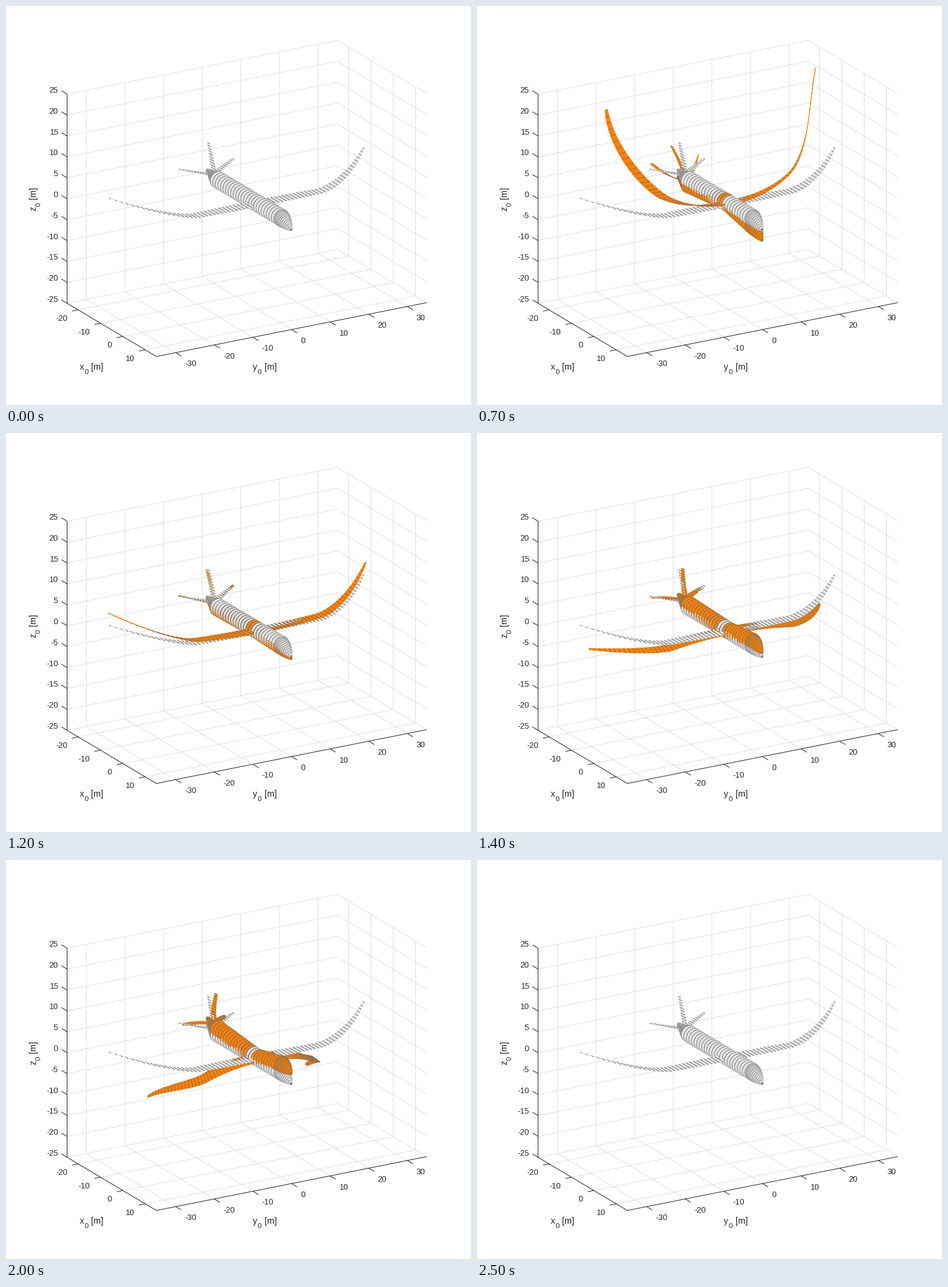
A matplotlib script that plays this animation: 750 px wide and 645 px high, repeating every 2600 ms.

```python
import numpy as np
import matplotlib.pyplot as plt
from matplotlib.animation import FuncAnimation
from matplotlib.collections import LineCollection, PolyCollection

W, H, DPI = 750, 645, 100
PX = 72 / DPI
FRAMES, INTERVAL = 26, 100
INK, GRID, EDGE = "#262626", "#dfdfdf", (0.42, 0.42, 0.42, 1)
LIGHT, ORANGE = (0.91, 0.91, 0.91, 1), (1, 0.5, 0, 1)
CLEAR = (0, 0, 0, 0)

# Orthographic view: metres to pixels, and depth towards the viewer
ORIGIN = np.array([406.0, 321.3])
VIEW = np.array([[3.6, 2.15], [6.229, -1.243], [0, -6.76]])
DEPTH = np.array([0.814, -0.47, 0.342])
X0, X1, Y0, Y1, Z0, Z1 = -25, 15, -35, 35, -25, 25


def project(points):
    return ORIGIN + np.asarray(points, float) @ VIEW


plt.rcParams["font.family"] = "Liberation Sans"
fig = plt.figure(figsize=(W / DPI, H / DPI), dpi=DPI, facecolor="white")
ax = fig.add_axes([0, 0, 1, 1])
ax.set_xlim(0, W)
ax.set_ylim(H, 0)
ax.axis("off")


def label(x, y, text, size=13, **kw):
    ax.text(x, y, text, fontsize=size * PX, color=INK, va="baseline", **kw)


def draw_axes():
    grid, ticks = [], []

    def tick(value, path, outward, dx, dy, ha):
        base = np.array(path[0], float)
        grid.append(path)
        ticks.append([base, base + outward])
        px, py = project(base)
        label(px + dx, py + dy, str(value), ha=ha)

    for x in range(-20, 11, 10):
        tick(x, [(x, Y0, Z0), (x, Y1, Z0), (x, Y1, Z1)],
             (0, -1.6, 0), -17, 18.5, "right")
    for y in range(-30, 31, 10):
        tick(y, [(X1, y, Z0), (X0, y, Z0), (X0, y, Z1)],
             (2.5, 0, 0), 15, 22.5, "left")
    for z in range(-25, 26, 5):
        tick(z, [(X0, Y0, z), (X0, Y1, z), (X1, Y1, z)],
             (-2.5, 0, 0), -14, -2, "right")
    spine = [(X0, Y0, Z1), (X0, Y0, Z0), (X1, Y0, Z0), (X1, Y1, Z0)]
    for lines, color in ((grid, GRID), (ticks + [spine], INK)):
        ax.add_collection(LineCollection([project(l) + 0.5 for l in lines],
                                         colors=color, linewidths=PX))


def axis_title(x, y, name, vertical=False):
    kw = dict(rotation=90, rotation_mode="anchor") if vertical else {}
    for text, along, drop, size in ((name, 0, 0, 14.3), ("0", 7.5, 7, 11.5),
                                    ("[m]", 18.5, 0, 14.3)):
        pos = (x + drop, y - along) if vertical else (x + along, y + drop)
        label(*pos, text, size, ha="left", **kw)


def fuselage(a):
    x = np.concatenate([np.linspace(-22.5, -18, 10)[:-1],
                        np.linspace(-18, 10.5, 26)[:-1],
                        np.linspace(10.5, 14.9, 12)])
    nose = np.clip((x - 10.5) / 4.4, 0, 1)
    tail = np.clip((-18 - x) / 4.5, 0, 1)
    r = 1.9 - 1.6 * nose ** 1.6 - 1.55 * tail
    z = 0.3 - 1.5 * nose ** 1.4 + 0.8 * tail
    arm = x + 0.7
    z += a * (0.1 - np.where(arm > 0, 0.17, -0.075) * arm)
    phi = np.linspace(0, 2 * np.pi, 25)
    return np.stack([x[:, None] + 0 * phi, r[:, None] * np.cos(phi),
                     z[:, None] + r[:, None] * np.sin(phi)], -1)


def strip(side, x, y, z, chord, yaw, pitch):
    """Chord sections, turned by yaw and pitch, along a spine."""
    spine = np.stack([x, side * y, z], -1)
    fore = np.stack([np.cos(pitch) * np.cos(yaw),
                     -side * np.cos(pitch) * np.sin(yaw),
                     np.sin(pitch)], -1) * chord[:, None] / 2
    return np.stack([spine - fore, spine, spine + fore], 1)


def wing(a, side):
    s = np.linspace(1.6, 32.8, 34)
    q = s / s[-1]
    outer = np.maximum(s - 15.9, 0)
    x = 0.1 - 0.068 * outer ** 1.75
    x += 3 * a * q ** 6 - a * a * (1.5 * q ** 3 + 25 * q ** 4 * (1 - q))
    y = s + 3.7 * a * q ** 1.2 - 9.7 * a * a * q ** 3
    z = 0.38 + 0.093 * outer ** 1.34
    z += 0.15 * a + (17.7 * a + 3.2 * a * a) * q ** 2.25
    return strip(side, x, y, z, 4 - 3.2 * q ** 2,
                 0.65 * a * q, 0.5 * a * np.sqrt(q))


def tailplane(a, side):
    t = np.linspace(0, 1, 11)
    return strip(side, -20.5 - 2.5 * t - 1.1 * a * a * t ** 2,
                 1 + 5.9 * t + (0.3 * a - 1.2 * a * a) * t ** 2,
                 1 + 1.4 * t + a * (2.17 * t ** 1.5 - 1.3),
                 2 - 1.1 * t, 0.4 * a * t, 0.3 * a * t)


def fin(a):
    t = np.linspace(0, 1, 11)
    return strip(0, -19.5 - 2.5 * t - 3.6 * a * t ** 1.5, 0 * t,
                 1.8 + 5.95 * t - a * (1.3 + 0.65 * t),
                 2.4 - 1.2 * t, 0 * t, 0 * t)


def mesh_items(mesh, color):
    """Fills and section lines of a mesh as (depth, polygon, fill, edge, width)."""
    flat, depth = project(mesh), mesh @ DEPTH
    sides = (depth[:, 1:] + depth[:, :-1]) / 2
    quads = (sides[1:] + sides[:-1]) / 2
    # A section line lies just above the nearer of its two neighbour quads
    lines = np.maximum(np.vstack([quads[:1], quads]),
                       np.vstack([quads, quads[-1:]])) + 0.05
    for i, j in np.ndindex(lines.shape):
        if i < len(quads):
            quad = [flat[i, j], flat[i, j + 1], flat[i + 1, j + 1], flat[i + 1, j]]
            yield quads[i, j], np.array(quad), color, color, 0.5 * PX
        yield lines[i, j], flat[i, j:j + 2], CLEAR, EDGE, PX


def aircraft(a, color):
    meshes = [fuselage(a), fin(a)]
    for side in (-1, 1):
        meshes += [wing(a, side), tailplane(a, side)]
    return [item for mesh in meshes for item in mesh_items(mesh, color)]


draw_axes()
axis_title(119, 588, "x")
axis_title(398, 588, "y")
axis_title(48, 331, "z", vertical=True)

still = aircraft(0, LIGHT)
model = PolyCollection([], zorder=3)
ax.add_collection(model)


def update(k):
    s = np.sin(2 * np.pi * k / (FRAMES - 1))
    a = s * (1 + 0.4 * np.exp(-(s / 0.3) ** 2))
    items = still + (aircraft(a, ORANGE) if abs(a) > 1e-6 else [])
    items = sorted(items, key=lambda item: item[0])
    _, polys, fills, edges, widths = zip(*items)
    model.set_verts(polys)
    model.set_facecolor(fills)
    model.set_edgecolor(edges)
    model.set_linewidth(widths)
    return [model]


anim = FuncAnimation(fig, update, frames=FRAMES, interval=INTERVAL,
                     repeat=True, repeat_delay=0)
plt.show()
```
